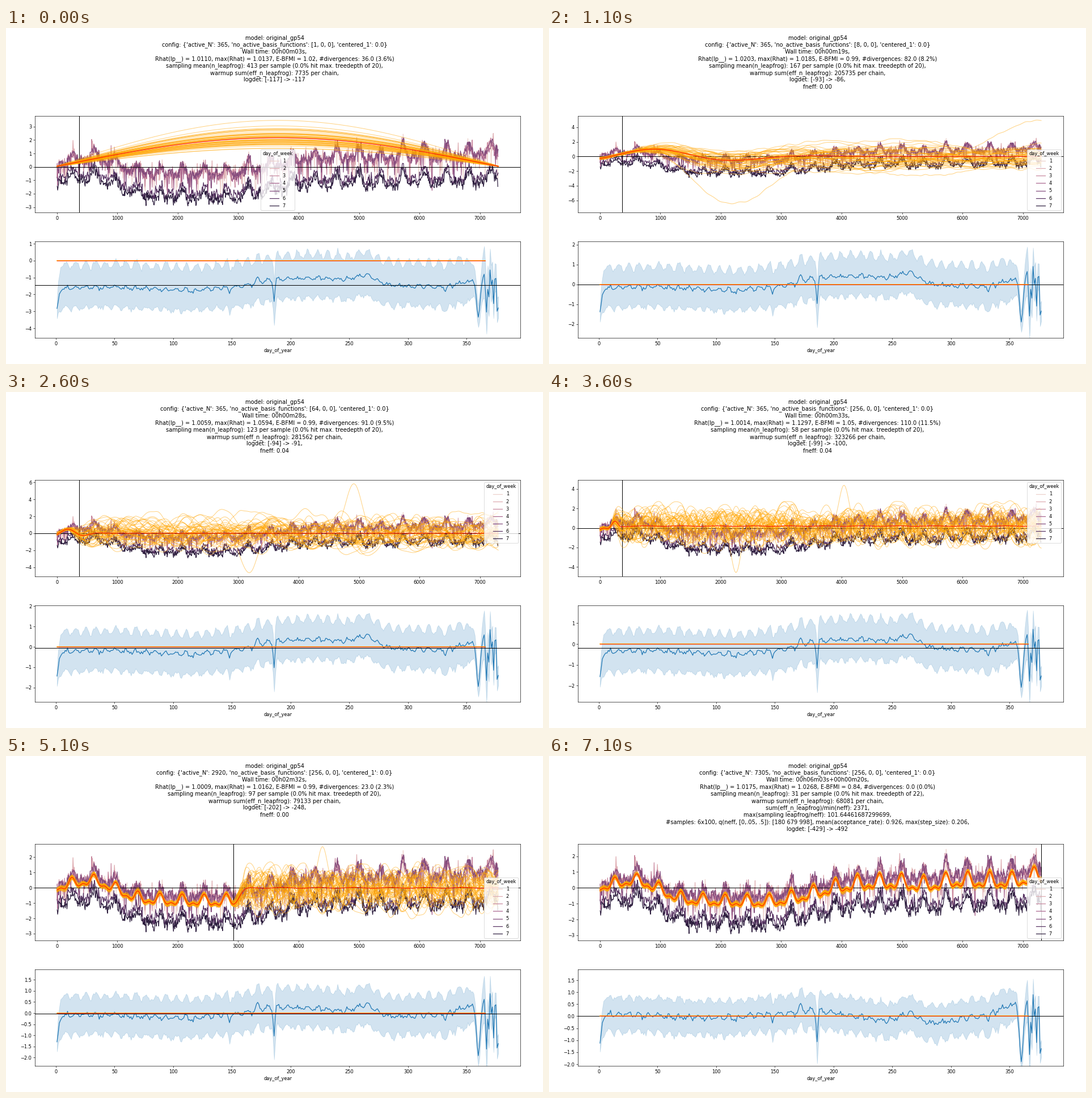
Recreate the animation shown at these times as a matplotlib script. Size 947 px wide and 592 px high, loop 7600 ms.

```python
import numpy as np
import matplotlib.pyplot as plt
from matplotlib.animation import FuncAnimation

W, H, DPI = 947, 592, 64
K = 59 / DPI  # scale of the default point sizes
DAYS = 7305
DRAWS = 50
LAST = 15

plt.rcParams.update({
    "font.family": "DejaVu Sans",
    "font.size": 10 * K,
    "axes.linewidth": 0.8 * K,
    "axes.labelpad": 4 * K,
    "lines.linewidth": 1.5 * K,
    "patch.linewidth": 1.0 * K,
})
for axis in ("xtick", "ytick"):
    plt.rcParams.update({f"{axis}.major.size": 3.5 * K,
                         f"{axis}.major.pad": 3.5 * K,
                         f"{axis}.major.width": 0.8 * K})

# Key values of the run; the steps between are interpolated.
KEY_STEPS = [0, 3, 5, 8, 10, 13, 15]
KEYS = {
    "seconds": [3, 19, 25, 33, 62, 331, 363],
    "rhat": [1.0110, 1.0203, 1.0081, 1.0014, 0.9968, 1.0092, 1.0175],
    "max_rhat": [1.0137, 1.0185, 1.0242, 1.1297, 1.0167, 1.0153, 1.0268],
    "bfmi": [1.02, 0.99, 0.96, 1.05, 1.01, 0.96, 0.84],
    "diverged": [36, 82, 82, 110, 28, 12, 0],
    "percent": [3.6, 8.2, 8.5, 11.5, 2.8, 1.2, 0],
    "leaps": [413, 167, 155, 58, 103, 86, 31],
    "warmup": [7735, 205735, 260710, 323266, 94155, 49089, 68081],
    "det_from": [-117, -93, -92, -99, -119, -368, -429],
    "det_to": [-117, -86, -87, -100, -158, -429, -492],
    "fneff": [0, 0, 0.04, 0.04, 0, 0, 0],
    "low": [-3.07, -7.07, -4.61, -4.52, -3.22, -3.05, -3.05],
    "high": [3.47, 4.94, 6.42, 4.47, 2.63, 2.5, 2.5],
    "low_at": [0, 2100, 3640, 2250, 1600, 0, 0],
    "high_at": [0, DAYS, 5350, 4040, 6600, 0, 0],
    "offset": [-1.445, 0, 0.02, -0.19, -0.03, 0, 0],
    "view_low": [-4.57, -2.70, -2.66, -2.79, -2.53, -2.07, -2.07],
    "view_high": [1.14, 2.16, 2.13, 1.86, 1.98, 1.95, 1.95],
}


def key(name, step):
    return float(np.interp(step, KEY_STEPS, KEYS[name]))


def basis_size(step):
    return min(2 ** step, 256)


def active_days(step):
    return min(365 * 2 ** max(step - 8, 0), DAYS)


def smooth(x, xs, ys, width):
    """Linear interpolation with rounded corners."""
    offsets = np.linspace(-width, width, 21)
    return np.mean([np.interp(x + o, xs, ys) for o in offsets], axis=0)


def bell(x, centre, width):
    return np.exp(-((x - centre) / width) ** 2)


def cubehelix(x, hue=0.8, rot=0.4):
    a = hue * x * (1 - x) / 2
    phi = 2 * np.pi * rot * x
    c, s = np.cos(phi), np.sin(phi)
    return (x + a * (-0.14861 * c + 1.78277 * s),
            x + a * (-0.29227 * c - 0.90649 * s),
            x + a * 1.97294 * c)


WEEK_COLORS = [cubehelix(x) for x in np.linspace(0.85, 0.15, 7)]


# ---------- long-term trend with a yearly wave ----------

def year_wave(t):
    phase = 2 * np.pi * (t - 245) / 365.25
    return 0.7 * np.cos(phase) + 0.4 * np.cos(2 * phase)


def trend(t):
    level = smooth(t, [0, 245, 610, 1340, 1900, 2800, 3350, 3900, 4400,
                       5000, 5360, 5800, 6900, DAYS],
                   [.05, .25, .55, -.72, -.85, -.9, -.55, .03, .3,
                    .33, .1, .42, .4, .85], 150)
    amp = np.interp(t, [0, 2500, 4500], [0.4, 0.43, 0.57])
    return level + amp * year_wave(t)


# ---------- daily observations, one line per weekday ----------

def running_noise(rng, span):
    raw = rng.normal(0, 1, DAYS + span - 1)
    return np.convolve(raw, np.ones(span), "valid") / np.sqrt(span)


def observations():
    rng = np.random.default_rng(7)
    t = np.arange(DAYS)
    week = (t + 2) % 7 + 1
    doy = (t % 365.25).astype(int) + 1
    workday = week < 6
    gain = np.interp(t, [0, DAYS], [0.8, 1.5])
    settled = np.interp(t, [0, 1500], [0, 1])
    offset = (0.42 + 0.1 * np.cos(2.2 * (week - 2.5))) * gain
    offset[week == 6] = (-0.6 - 0.45 * settled)[week == 6]
    offset[week == 7] = (-1.0 - 0.4 * settled)[week == 7]
    y = trend(t) + offset
    y += 0.13 * running_noise(rng, 21) + 0.15 * rng.normal(0, 1, DAYS)

    depth = np.interp(t, [0, DAYS], [0.8, 1.6])
    fixed = np.isin(doy, [1, 185, 359, 360])
    moving = (week == 1) & ((abs(doy - 148) < 4) | (abs(doy - 247) < 4))
    y -= depth * np.where(workday, 1, 0.25) * (fixed | moving)
    y -= rng.uniform(0.4, 1.3, DAYS) * (rng.random(DAYS) < 0.035) * workday
    y += rng.uniform(0.2, 0.9, DAYS) * (rng.random(DAYS) < 0.03) * (week < 4)
    y = np.clip(y, KEYS["low"][-1], KEYS["high"][-1])
    return [(t[week == d], y[week == d]) for d in range(1, 8)]


WEEK_LINES = observations()

# ---------- effect of the day of the year ----------

DOY = np.arange(1, 378)


def day_effects():
    """Middle, lower and upper curves, before and after the full fit."""
    rng = np.random.default_rng(3)
    plain = DOY < 357
    ripple = np.cos(2 * np.pi * (DOY - 8) / 8.6) * (DOY > 5) * (DOY < 352)
    noise = rng.normal(0, 1, (3, DOY.size)) * plain

    level = np.interp(DOY, [1, 50, 118, 165, 188, 225, 250, 290, 330, 352],
                      [-.2, -.12, -.35, 0, .35, .47, .33, -.02, -.1, .2])
    level += 0.4 * bell(DOY, 264, 10)
    level -= 1.3 * np.exp(-(DOY - 1) / 1.6)
    for day, depth, width in ((148, .4, 1), (172, -.25, 2), (186, 1.3, 1),
                              (332, .25, 2), (360, 2.1, 2), (365, -.45, 1.5)):
        level -= depth * bell(DOY, day, width)
    # moving holidays sit after the ordinary days
    level[365:] = [-.3, -1.6, -.25, -.7, .9, 0, .3, -1.1, .35, .4, -1.55, -1.35]

    shape = np.interp(DOY, [1, 4, 350, 360, 365, 377], [.5, 1, 1, .5, 1.2, .5])
    sets = []
    for base, width, swing in ((level, 1.0, 0.2),
                               (level - 0.5 * year_wave(DOY) * plain, 0.72, 0.1)):
        sets.append((base + 0.08 * ripple + 0.05 * noise[0],
                     base - width * shape + 0.11 * ripple + 0.06 * noise[1],
                     base + width * shape + swing * ripple + 0.05 * noise[2]))
    return np.array(sets)


RAW, FIT = day_effects()

# ---------- curves drawn from the model ----------

GRID = np.linspace(0, DAYS, 420)


def sine_draws(rng, size):
    """Few sine waves that share a slope near the start."""
    u = np.pi * (GRID + 50) / (DAYS + 100)
    slope = 2.15 + 0.45 * rng.normal(0, 1, DRAWS).clip(-1.7, 2.5)
    slope[0] = KEYS["high"][0]
    total, used = 0, 0
    for j in range(1, size):
        c = rng.normal(0.6 / j, 0.8, DRAWS)
        total = total + np.outer(c, np.sin(j * u))
        used = used + j * c
    total = total + np.outer((slope - used) / size, np.sin(size * u))
    return total, total.mean(axis=0)


def random_waves(rng, length):
    n = 14
    out = np.zeros((DRAWS, GRID.size))
    for _ in range(n):
        freq = rng.normal(0, 1 / length, (DRAWS, 1))
        out += np.cos(freq * GRID + rng.uniform(0, 2 * np.pi, (DRAWS, 1)))
    return out * np.sqrt(2 / n)


def mean_curve(size, n):
    if size < 128:
        # coarse bases overshoot and ring out
        ratio = 8 / size
        period = 2900 * ratio ** 0.77
        ring = np.sin(2 * np.pi * (GRID / period - 0.06))
        return ratio ** 0.35 * ring * bell(GRID, 0.31 * period, 0.6 * period)
    base = 0.2 if n == 365 else 0
    fade = np.exp(-(np.maximum(GRID - n, 0) / 130) ** 2)
    wiggle = 0.03 * np.sin(GRID / 95) * (1 - fade)
    return base + (trend(np.minimum(GRID, n)) - base) * fade + wiggle


def posterior(step):
    n, size = active_days(step), basis_size(step)
    rng = np.random.default_rng(40 + min(step, 13))
    if size < 8:
        return sine_draws(rng, size)
    length = 70 + 6400 / size
    mean = mean_curve(size, n)
    start = 150 if n == 365 else n - 30
    rise = 1 - bell(np.maximum(GRID, start), start, 1.5 * length)
    spread = 0.9 if n == 365 else 0.7
    spread = spread * np.exp(0.25 * rng.normal(0, 1, (DRAWS, 1)))
    away = rise * spread * random_waves(rng, length)
    limit = 0.65 * np.where(away > 0, key("high", step), -key("low", step))
    away = limit * np.tanh(away / limit)
    for row, side in zip(away, ("low", "high")):
        centre = key(side + "_at", step)
        height = key(side, step) - np.interp(centre, GRID, mean)
        bump = bell(GRID, centre, 1.2 * length)
        row *= 0.3 * (1 - bump)
        row += rise * height * bump
    return mean + away + 0.08 * random_waves(rng, 60), mean


# ---------- drawing ----------

def title_lines(step):
    def whole(name):
        return round(key(name, step))

    final = step == LAST
    minutes, seconds = divmod(whole("seconds"), 60)
    extra = "+00h00m20s" if final else ""
    lines = [
        "model: original_gp54",
        f"config: {{'active_N': {active_days(step)}, "
        f"'no_active_basis_functions': [{basis_size(step)}, 0, 0], "
        "'centered_1': 0.0}",
        f"Wall time: 00h{minutes:02d}m{seconds:02d}s{extra},",
        f"Rhat(lp__) = {key('rhat', step):.4f}, "
        f"max(Rhat) = {key('max_rhat', step):.4f}, "
        f"E-BFMI = {key('bfmi', step):.2f}, "
        f"#divergences: {whole('diverged')}.0 ({key('percent', step):.1f}%)",
        f"sampling mean(n_leapfrog): {whole('leaps')} per sample "
        f"(0.0% hit max. treedepth of {22 if final else 20}),",
        f"warmup sum(eff_n_leapfrog): {whole('warmup')} per chain,",
    ]
    if final:
        lines += [
            "sum(eff_n_leapfrog)/min(neff): 2371,",
            "max(sampling leapfrog/neff): 101.64461687299699,",
            "#samples: 6x100, q(neff, [0,.05, .5]): [180 679 998], "
            "mean(acceptance_rate): 0.926, max(step_size): 0.206,",
        ]
    logdet = f"logdet: [{whole('det_from')}] -> {whole('det_to')}"
    if final or step == 0:
        return lines + [logdet]
    return lines + [logdet + ",", f"fneff: {key('fneff', step):.2f}"]


fig = plt.figure(figsize=(W / DPI, H / DPI), dpi=DPI, facecolor="white")


def add_panel(top, bottom):
    return fig.add_axes([51 / W, 1 - bottom / H, 856 / W, (bottom - top) / H])


upper = add_panel(155, 325)
lower = add_panel(376, 546)
titles = [fig.text(0.5, 1 - (19.8 + 12.43 * i) / H, "", ha="center",
                   va="baseline", fontsize=12 * K) for i in range(10)]


def legend_place(step):
    if step < 2:
        return "lower center"
    return "upper right" if 5 <= step <= 8 else "lower right"


def draw_upper(step):
    ax = upper
    ax.clear()
    for day, (x, y) in enumerate(WEEK_LINES):
        ax.plot(x, y, color=WEEK_COLORS[day], label=str(day + 1))
    ax.axhline(0, color="black", lw=1.2 * K)
    ax.axvline(active_days(step), color="black", lw=1.2 * K)
    draws, mean = posterior(step)
    ax.plot(GRID, draws.T, color="orange", alpha=0.5, lw=1.2 * K)
    ax.plot(GRID, mean, color="red", alpha=0.8)
    ax.set_xlim(-0.05 * DAYS, 1.05 * DAYS)
    low, high = key("low", step), key("high", step)
    margin = 0.05 * (high - low)
    ax.set_ylim(low - margin, high + margin)
    ax.legend(title="day_of_week", loc=legend_place(step))


def draw_lower(step):
    ax = lower
    ax.clear()
    offset = key("offset", step)
    mix = np.interp(step, [10, 11, 12, 13], [0.05, 0.45, 0.85, 1])
    mid, low, high = (1 - mix) * RAW + mix * FIT + offset
    widen = 0.4 * 0.5 ** step
    high = high + widen * (high - mid)
    low = low - 0.5 * widen * (mid - low)
    ax.fill_between(DOY, low, high, color="#1f77b4", alpha=0.2)
    ax.plot(DOY, mid, color="#1f77b4")
    ax.axhline(offset, color="black", lw=1.2 * K)
    ax.plot([1, 366], [0, 0], color="orange", lw=2 * K)
    ax.plot([1, 366], [0, 0], color="red", alpha=0.65, lw=1.3 * K)
    ax.set_xlim(1 - 18.8, 377 + 18.8)
    ax.set_ylim(key("view_low", step), key("view_high", step))
    ax.set_xlabel("day_of_year")


shown = None


def show_step(step):
    global shown
    if step == shown:
        return
    shown = step
    lines = title_lines(step)
    for i, text in enumerate(titles):
        text.set_text(lines[i] if i < len(lines) else "")
    draw_upper(step)
    draw_lower(step)


def init():
    show_step(0)
    return []


def update(i):
    # a short first step, then half a second for each
    show_step((i + 4) // 5)
    return []


anim = FuncAnimation(fig, update, frames=76, init_func=init, interval=100,
                     repeat=True, repeat_delay=0, blit=False)
plt.show()
```
